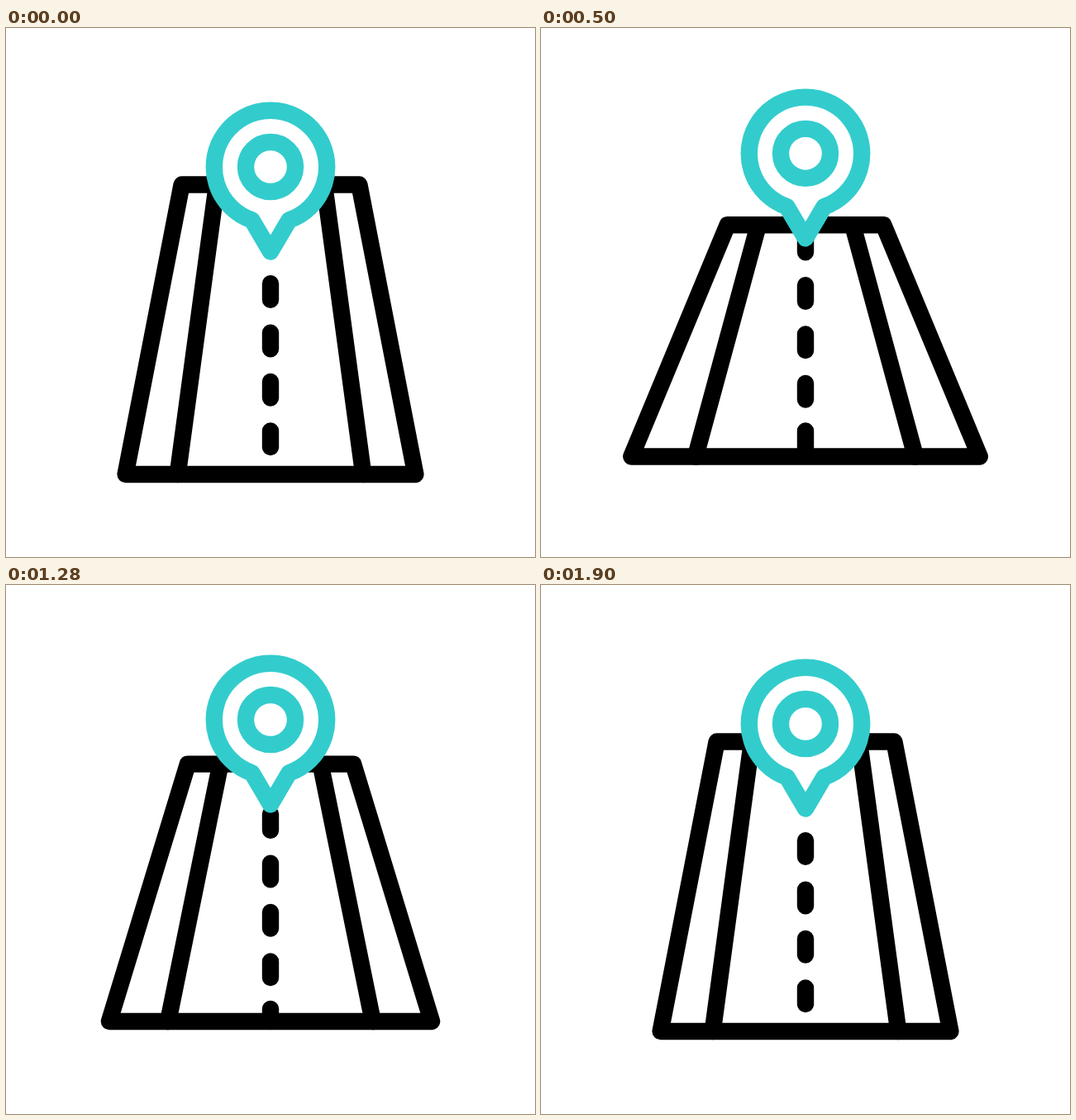
Animation, 640 px wide and 640 px high, one loop 3000 ms. Source, as an HTML page:

```html
<!DOCTYPE html>
<html lang="en">
<head>
<meta charset="utf-8">
<title>Road and pin</title>
<style>
  html, body { margin: 0; width: 100%; height: 100%; overflow: hidden; background: #fff; }
  svg { display: block; width: 100%; height: 100%; }
  path, circle { fill: none; stroke-width: 20.4; stroke-linecap: round; stroke-linejoin: round; }
  #road path { stroke: #000; }
  #splash, #pin path, #pin circle { stroke: #33cccc; }
  #pin path { fill: #fff; }
</style>
</head>
<body>
<svg viewBox="0 0 640 640">
  <g id="road">
    <path id="outline"/>
    <path id="lanes"/>
    <path id="dashes"/>
  </g>
  <path id="splash"/>
  <g id="pin">
    <path d="M297.5 232.4A68.2 68.2 0 1 1 342.5 232.4L320 270.5Z"/>
    <circle cx="320" cy="168" r="30"/>
  </g>
</svg>
<script>
const LOOP = 3000;
const DASH_STEP = 59.4, DASH_LENGTH = 19.6;
const [outline, lanes, dashes, splash, pin] =
  ['outline', 'lanes', 'dashes', 'splash', 'pin'].map(id => document.getElementById(id));

// Each key is [time, value]; values ease in and out between keys.
const roadKeys = [[0, 0], [840, 1], [1580, 0]];
const liftKeys = [[85, 0], [1055, 41], [1070, 41], [1340, 0]];
const swayKeys = [[1340, 0], [1460, -2.4], [1620, 1.8], [1760, -1], [1900, 0]];
const headKeys = [[1340, 0], [1460, 1]];
const tailKeys = [[1500, 0], [1640, 1]];

const mix = (a, b, u) => a + (b - a) * u;

function ease(keys, t) {
  if (t <= keys[0][0]) return keys[0][1];
  for (let i = 1; i < keys.length; i++) {
    const [t0, a] = keys[i - 1], [t1, b] = keys[i];
    if (t < t1) {
      const u = (t - t0) / (t1 - t0);
      return mix(a, b, u * u * (3 - 2 * u));
    }
  }
  return keys[keys.length - 1][1];
}

const line = (x0, y0, x1, y1) => `M${x0} ${y0}L${x1} ${y1}`;
const mirrored = (x0, y0, x1, y1, axis = 320) =>
  line(x0, y0, x1, y1) + line(2 * axis - x0, y0, 2 * axis - x1, y1);

function drawRoad(tilt) {
  const top = mix(189.5, 265.4, tilt), bottom = mix(540, 506.6, tilt);
  const topX = mix(212.6, 232.8, tilt), bottomX = mix(144.6, 89.6, tilt);
  outline.setAttribute('d',
    `M${topX} ${top}H${640 - topX}L${640 - bottomX} ${bottom}H${bottomX}Z`);
  lanes.setAttribute('d',
    mirrored(mix(255, 267.4, tilt), top, mix(207.7, 175.4, tilt), bottom));

  const first = mix(309.2, 219.8, tilt);
  let d = '';
  for (let i = -1; i <= 4; i++) {
    const start = first + i * DASH_STEP - (i === 4 ? 1.8 : 0);
    const from = Math.max(start, top), to = Math.min(start + DASH_LENGTH, bottom);
    if (from < to) d += line(320, from, 320, to);
  }
  dashes.setAttribute('d', d);
}

function drawSplash(head, tail) {
  const x = u => mix(288.6, 273, u), y = u => mix(281.8, 272.1, u);
  splash.setAttribute('d',
    head > tail ? mirrored(x(tail), y(tail), x(head), y(head), 320.4) : '');
}

function draw(now) {
  const t = now % LOOP;
  drawRoad(ease(roadKeys, t));
  drawSplash(ease(headKeys, t), ease(tailKeys, t));
  pin.setAttribute('transform',
    `translate(0 ${-ease(liftKeys, t)}) rotate(${ease(swayKeys, t)} 320 270.5)`);
}

const begin = performance.now();
function tick() {
  draw(performance.now() - begin);
  requestAnimationFrame(tick);
}
tick();
</script>
</body>
</html>
```
